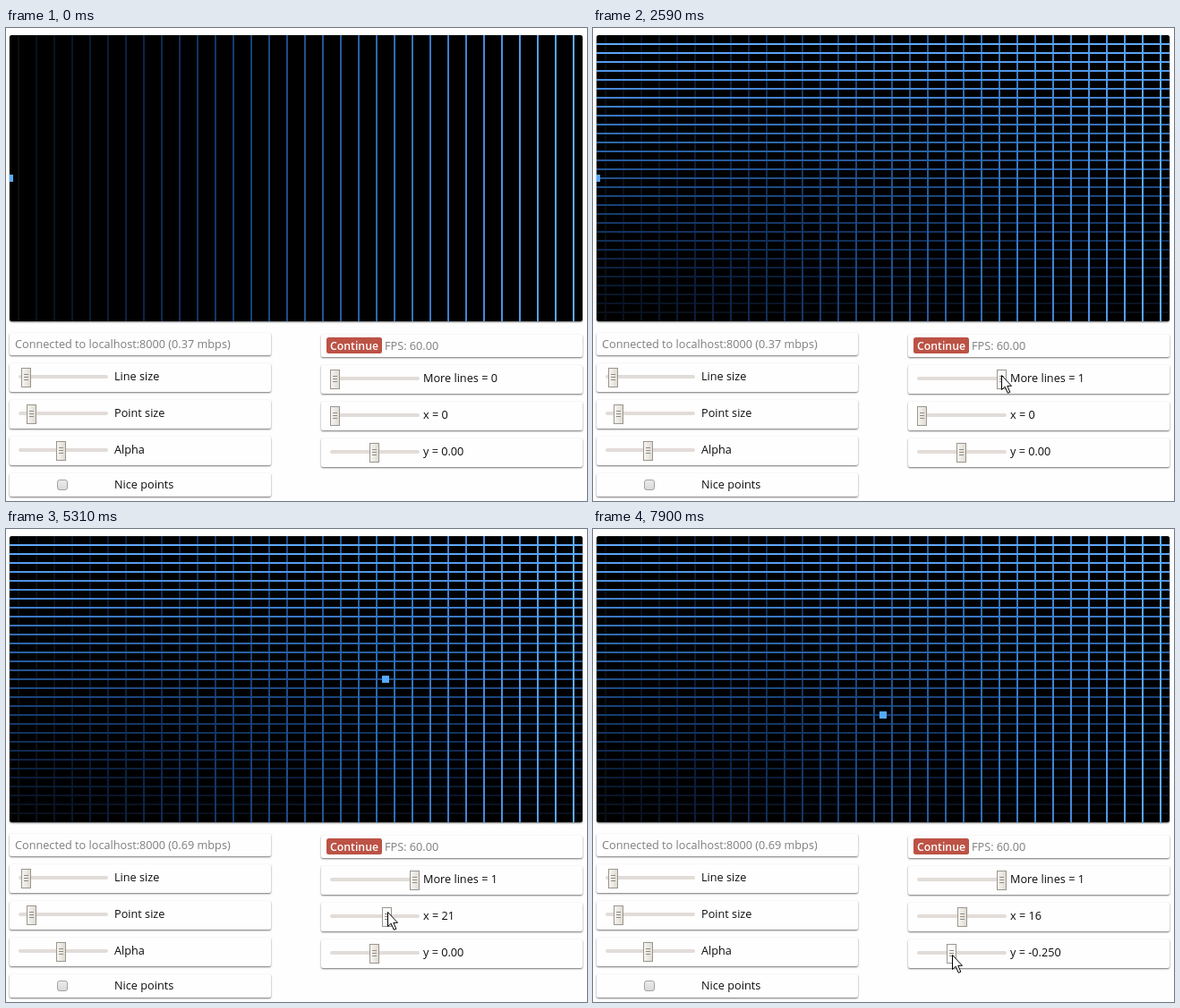
An HTML page with a canvas for the animation above (8000 ms loop, 649 px wide and 529 px high).

```html
<!DOCTYPE html>
<html lang="en">
<head>
<meta charset="utf-8">
<title>Line and point controls</title>
<style>
html, body { margin: 0; width: 100%; height: 100%; overflow: hidden; background: #fefefe; }
body { position: relative; }
canvas, svg, .card { position: absolute; }
canvas, .card { box-shadow: 0 1px 2px rgba(0, 0, 0, .55); }
canvas { left: 4px; top: 8px; border-radius: 3px; background: #000; }
.card { width: 292px; border-radius: 2px; background: #fefefe; }
svg { left: 0; top: 0; }
text { font: 12.7px "Open Sans", "Noto Sans", sans-serif; fill: #0c0c0c; white-space: pre; }
.info { fill: #7e7e7e; }
.button { fill: #fff; font-size: 12.3px; font-weight: 600; }
.track { fill: #e2dcd8; }
.thumb { fill: url(#face); }
.thumb.hot { fill: url(#bright); }
</style>
</head>
<body>
<canvas id="view" width="640" height="320"></canvas>
<svg id="ui" width="649" height="529">
  <defs>
    <linearGradient id="face"><stop stop-color="#f8f6f2"/><stop offset="1" stop-color="#dedad2"/></linearGradient>
    <linearGradient id="bright"><stop stop-color="#fff"/><stop offset="1" stop-color="#f6f5f2"/></linearGradient>
    <linearGradient id="check" x2="0" y2="1"><stop stop-color="#ececec"/><stop offset="1" stop-color="#d9d9d9"/></linearGradient>
    <g id="knob">
      <rect x="-5" y="-10" width="10" height="21" stroke="#99968f"/>
      <path d="M-2.5 -3H2.5M-2.5 0H2.5M-2.5 3H2.5" stroke="#8f8b84"/>
    </g>
  </defs>
  <text id="net" class="info" x="10" y="358"></text>
  <rect x="358" y="346" width="62" height="18" rx="2.5" fill="#bc5245"/>
  <text class="button" x="362" y="360">Continue</text>
  <text class="info" x="423" y="360">FPS: 60.00</text>
  <rect x="57.5" y="505.5" width="11" height="11" rx="2.5" fill="url(#check)" stroke="#a3a3a3"/>
  <text x="121" y="515">Nice points</text>
  <g id="sliders"></g>
  <path id="cursor" d="M.5 .5V16.5L4.2 13.2L7.3 20.3L9.8 19.3L6.8 12.3H11.5Z" fill="#fff" stroke="#000"/>
</svg>
<script>
const LOOP = 8000;
const $ = id => document.getElementById(id);
const mix = (a, b, f) => a + (b - a) * f;
const snap = { lines: Math.round, x: Math.round, y: v => Math.round(v * 100) / 100 };

// The view shows lines and y one step after the slider.
const steps = [{ t: 0, at: null, lines: 0, x: 0, y: 0, grid: 0, py: 0 }];

// One cursor stroke in even steps, easing out; it may drag one slider value along.
function stroke(begin, end, count, from, to, { key, span, pow = 2 } = {}) {
  for (let i = 0; i < count; i++) {
    const last = steps[steps.length - 1];
    const u = i / (count - 1), e = 1 - (1 - u) ** pow;
    const step = { ...last, grid: last.lines, py: last.y };
    step.t = Math.floor(mix(begin, end, u) / 10) * 10;
    step.at = from.map((v, k) => Math.round(mix(v, to[k], e)));
    if (key) step[key] = snap[key](mix(...span, e));
    steps.push(step);
  }
}

stroke(1120, 1730, 6, [512, 515], [367, 388]);
stroke(2220, 2590, 4, [391, 387], [456, 388], { key: "lines", span: [0, 1], pow: 3 });
stroke(2810, 3540, 7, [450, 394], [367, 431]);
stroke(3660, 4380, 7, [366, 431], [406, 427], { key: "x", span: [0, 13], pow: 1.2 });
stroke(4500, 4980, 5, [410, 427], [443, 427], { key: "x", span: [15, 27] });
stroke(5200, 5650, 5, [436, 428], [413, 429], { key: "x", span: [25, 16] });
stroke(5890, 6250, 4, [416, 440], [410, 477]);
stroke(6490, 7060, 6, [409, 477], [446, 469], { key: "y", span: [-.03, .78] });
stroke(7170, 7290, 2, [444, 469], [441, 469], { key: "y", span: [.74, .72] });
stroke(7410, 7900, 5, [432, 471], [401, 476], { key: "y", span: [.58, -.25], pow: 4 });

function addCard(left, top, height) {
  const card = document.createElement("div");
  card.className = "card";
  card.style.cssText = `left:${left}px;top:${top}px;height:${height}px`;
  document.body.insertBefore(card, $("ui"));
}

function addNode(tag, attrs) {
  const node = document.createElementNS("http://www.w3.org/2000/svg", tag);
  for (const k in attrs) node.setAttribute(k, attrs[k]);
  return $("sliders").appendChild(node);
}

function addSlider(left, top, labelX, offset, label) {
  addCard(left, top, 32);
  addNode("rect", { class: "track", x: left + 10, y: top + 13, width: 100, height: 4, rx: 2 });
  const knob = addNode("use", { href: "#knob", class: "thumb" });
  const text = addNode("text", { x: labelX, y: top + 19 });
  const set = (pos, str, hot) => {
    knob.setAttribute("transform", `translate(${left + 15.5 + Math.round(pos)} ${top + 15.5})`);
    knob.classList.toggle("hot", !!hot);
    text.textContent = str;
  };
  set(offset, label);
  return set;
}

addCard(4, 341, 25);
addCard(4, 498, 26);
addCard(352, 343, 25);
addSlider(4, 375, 121, 3, "Line size");
addSlider(4, 416, 121, 9, "Point size");
addSlider(4, 457, 121, 42, "Alpha");
const setLines = addSlider(352, 377, 466, 0, "");
const setX = addSlider(352, 418, 466, 0, "");
const setY = addSlider(352, 459, 466, 44, "");

const ctx = $("view").getContext("2d");
const shade = f => `rgb(${[mix(9, 98, f ** 2), mix(15, 170, f ** 1.3), mix(20, 255, f)].map(Math.round)})`;

function drawView(s) {
  ctx.globalCompositeOperation = "source-over";
  ctx.fillStyle = "#000";
  ctx.fillRect(0, 0, 640, 320);
  ctx.globalCompositeOperation = "lighten";
  for (let i = 0; i < 32; i++) {
    ctx.fillStyle = shade(i / 31);
    ctx.fillRect(9 + 20 * i, 0, 2, 320);
    if (s.grid) ctx.fillRect(0, 319 - 10 * i, 640, 2);
  }
  ctx.globalCompositeOperation = "source-over";
  ctx.fillStyle = "#55aaff";
  ctx.fillRect(20 * s.x - 4, Math.floor(156 - 160 * s.py), 8, 8);
}

function show(s) {
  const t = s.t;
  const rate = t < 3050 ? "0.37" : t < 4020 ? "0.48" : t < 4740 ? "0.68" : "0.69";
  $("net").textContent = `Connected to localhost:8000 (${rate} mbps)`;
  setLines(89 * s.lines, "More lines = " + s.lines, t >= 2220 && t < 2810);
  setX(89 * s.x / 32, "x = " + s.x, t >= 3420 && t < 6010);
  setY(44 + 44.5 * s.y, "y = " + s.y.toPrecision(3), t >= 6130);
  $("cursor").style.display = s.at ? "" : "none";
  if (s.at) $("cursor").setAttribute("transform", `translate(${s.at})`);
  drawView(s);
}

const start = performance.now();
let shown;
function tick(now) {
  const t = Math.max(0, now - start) % LOOP;
  let k = steps.length - 1;
  while (steps[k].t > t) k--;
  if (k !== shown) show(steps[shown = k]);
  requestAnimationFrame(tick);
}
tick(start);
</script>
</body>
</html>
```
